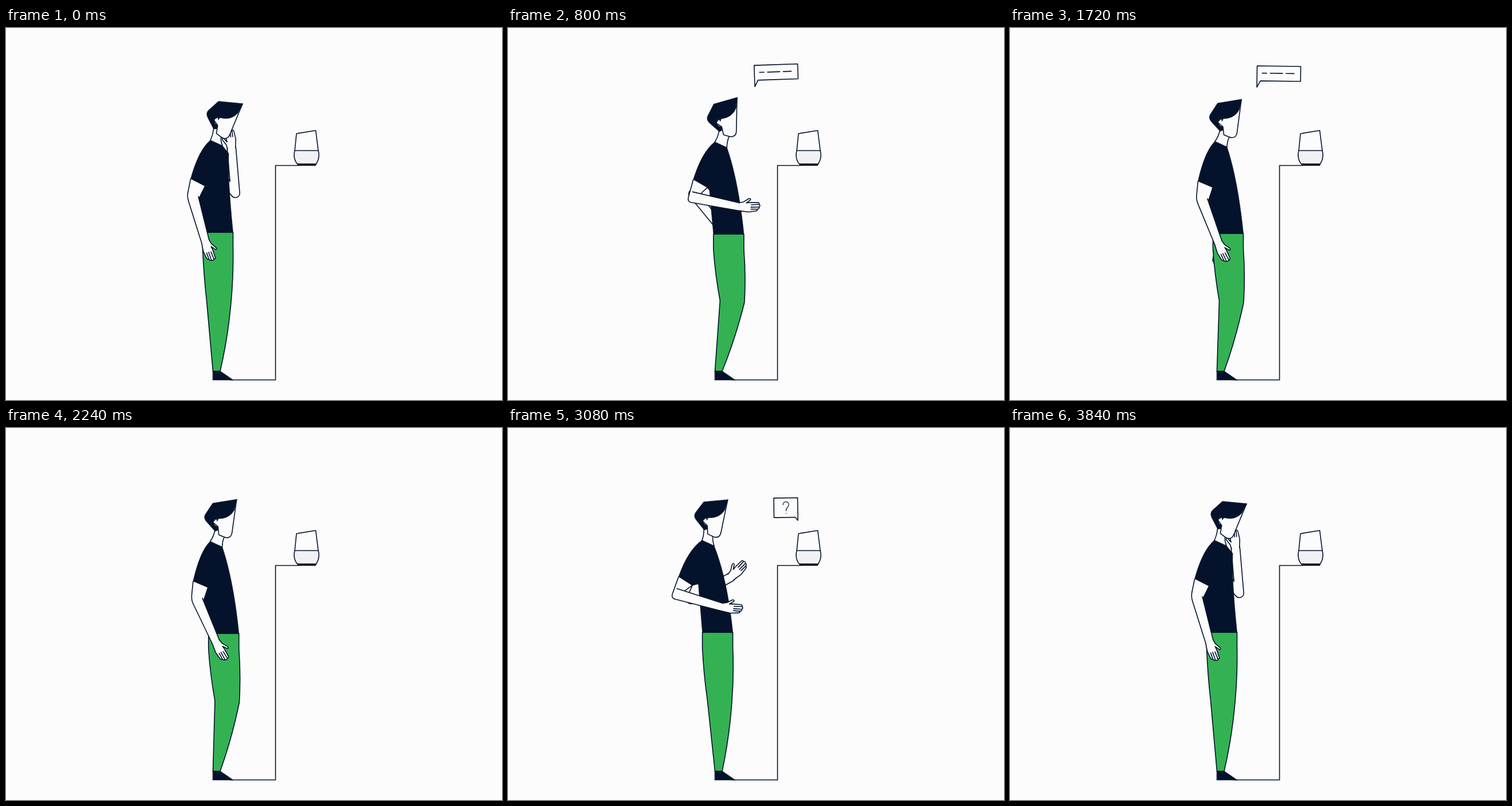
Recreate the animation shown at these times as an HTML page. Size 864x648 px, loop 3880 ms.

```html
<!DOCTYPE html>
<html lang="en">
<head>
<meta charset="utf-8">
<title>Talking to a speaker</title>
<style>
  html, body { margin: 0; width: 100%; height: 100%; overflow: hidden; background: #fcfcfc; }
  svg { display: block; width: 100vw; height: 100vh; }
  .line { fill: none; stroke: #04122b; stroke-width: 1.6; stroke-linejoin: round; stroke-linecap: round; }
  .thin { stroke-width: .6; }
  .skin { fill: #fcfcfc; }
  .navy { fill: #04122b; }
  .green { fill: #34b253; }
</style>
</head>
<body>
<svg viewBox="0 0 864 648">
  <defs>
    <g id="hand">
      <path class="line skin" d="M0 0 L8 -1 L18 -6.3 Q22 -6 20 -3.6 L12.5 1.2 L18 .8 L33 1.8 Q36 2.6 34.5 5
        Q37.6 7 34.5 9.8 Q35.5 12.4 31.5 13.2 Q31.5 16.2 27 16.3 L15 17 L0 14"/>
      <path class="line" d="M21 5 H34.5 M20 9 L34.5 9.8 M20 12.5 L31.5 13.2"/>
    </g>
    <g id="head">
      <path class="line skin" d="M-.5 1 L-8 58 Q-9 67 -17 67 Q-20 67 -31 62 L-32.5 48 L-42 40 L-34 32Z"/>
      <path class="line thin navy" d="M0 0 L-42 7 L-55 27 Q-58 33 -53 39 L-37.5 56 L-32.5 54 L-33 48
        C-40 47 -43 38 -38.5 35 Q-36 34 -35 35.5 L-34 38.5 L-32 34 Q-13 34 -4.5 19Z"/>
    </g>
  </defs>
  <rect width="864" height="648" fill="#fcfcfc"/>

  <path class="line" d="M390 613 H469.5 V239.5 H510"/>
  <path fill="#f0f1f4" d="M503 213.5 H544 C547 225 543 233 539 238 H509 C503 232 500 225 503 213.5Z"/>
  <path class="line" d="M503 213.5 L506 184 L539.5 178.5 L544 213.5 C547 225 543 233 539.5 238
    H508.5 C503 232 500 225 503 213.5 H544"/>
  <path class="navy" d="M506.5 236 H541.5 L539.5 240 H509.5Z"/>

  <path id="neck" class="skin"/>
  <path id="neckLine" class="line"/>
  <path id="farEdge" class="line" style="stroke-width:16.8"/>
  <path id="farFill" class="line" style="stroke-width:13.6;stroke:#fcfcfc"/>
  <use id="farHand" href="#hand"/>
  <path id="pants" class="line green"/>
  <path class="line thin navy" d="M360.3 597.5 H373 L396 613.3 H360.3Z"/>
  <path id="shirt" class="line thin navy"/>
  <use id="face" href="#head"/>
  <path id="arm" class="skin"/>
  <path id="armLine" class="line"/>
  <use id="nearHand" href="#hand"/>

  <g id="talk">
    <path class="line" d="M0 0 V-37 H76 V-11 H6Z"/>
    <path id="words" class="line" d="M9 -24.5 h8 m5.5 0 h21.5 m7 0 h14"/>
  </g>
  <g id="ask">
    <path class="line" d="M0 0 V-39.5 H-41.5 V-5.5 H-4.5Z"/>
    <path id="hook" class="line" style="stroke-width:1.2" pathLength="1"
      d="M-25.5 -27.5 C-25.5 -34.5 -15.5 -34.5 -15.5 -27.5 C-15.5 -22.5 -20.5 -24 -20.5 -17"/>
    <circle id="dot" class="navy" cx="-20.5" cy="-12.5" r=".8"/>
  </g>
</svg>
<script>
const LOOP = 3880, RAD = Math.PI / 180;
const $ = id => document.getElementById(id);
const clamp = v => Math.max(0, Math.min(1, v));
const add = (a, b) => [a[0] + b[0], a[1] + b[1]];
const mix = (a, b, k) => [a[0] + (b[0] - a[0]) * k, a[1] + (b[1] - a[1]) * k];
const turn = ([x, y], deg) => {
  const c = Math.cos(deg * RAD), s = Math.sin(deg * RAD);
  return [x * c - y * s, x * s + y * c];
};
const toward = (a, b, d) => mix(a, b, d / Math.hypot(b[0] - a[0], b[1] - a[1]));
const set = (id, d) => $(id).setAttribute('d', d);
const place = (id, p, deg, s = 1) =>
  $(id).setAttribute('transform', `translate(${p}) rotate(${deg}) scale(${s})`);

// Joint positions across the stage, and limb angles in degrees; the rest of the figure follows.
const think  = { hip: 395.5, hem: 356, knee: 392, collar: 356, face: 56.5, nod: 15, upper: 27, fore: 63, swing: -43, far: -100 };
const start  = { hip: 409, hem: 360, knee: 415, collar: 360, face: 37, nod: -8, upper: 36, fore: 12, swing: 47, far: 24 };
const offer  = { hip: 410.5, hem: 357, knee: 404, collar: 359.5, face: 45.5, nod: 0, upper: 20, fore: 3, swing: 26, far: 55 };
const wait   = { hip: 406.5, hem: 358, knee: 407, collar: 357, face: 46.5, nod: 0, upper: 23, fore: 58, swing: 5, far: 75 };
const listen = { hip: 391.5, hem: 357, knee: 395, collar: 331, face: 45.5, nod: 7, upper: 26, fore: -2, swing: 33, far: 2 };
const wave   = { hip: 393.5, hem: 355.5, knee: 388, collar: 347, face: 46.5, nod: 3, upper: 36, fore: 23, swing: 7, far: -59 };

const KEYS = [[0, think], [520, start], [1160, offer], [1720, wait], [2200, wait],
  [2720, listen], [3360, wave], [3840, think]].map(([t, p]) => ({ t, p }));

function slope(i, n) {
  const a = KEYS[i - 1], b = KEYS[i + 1];
  return a && b ? (b.p[n] - a.p[n]) / (b.t - a.t) : 0;
}

// Smooth curve through the key poses
function poseAt(t) {
  let i = 0;
  while (i < KEYS.length - 2 && t >= KEYS[i + 1].t) i++;
  const a = KEYS[i], b = KEYS[i + 1], span = b.t - a.t, u = clamp((t - a.t) / span);
  const ease = u * u * (3 - 2 * u), pose = {};
  for (const n in a.p) {
    pose[n] = a.p[n] + (b.p[n] - a.p[n]) * ease
      + span * u * (1 - u) * ((1 - u) * slope(i, n) - u * slope(i + 1, n));
  }
  return pose;
}

function drawBody({ hip, hem, knee, collar, face, nod, upper, fore, swing, far }) {
  const nape = [collar, hem - 160.5], front = add(nape, [21, 9.5]);
  const reach = clamp(-swing / 43), chest = add(front, [11 * reach, 13.5 * reach]);

  // Head and neck
  const tip = add(nape, [face, .65 * nod - 73.5]);
  const skull = add(tip, turn([-38, 55], nod)), chin = add(tip, turn([-21.5, 66], nod));
  const back = `${add(mix(skull, nape, .5), [1.5, 2])} ${nape}`;
  const throat = add(mix(chin, front, .4), [-2, 0]);
  set('neck', `M${skull} Q${back} L${front} Q${throat} ${chin}Z`);
  set('neckLine', `M${skull} Q${back} M${chin} Q${throat} ${front}`);
  place('face', tip, nod);

  // Legs
  const rear = hip - 53, rearKnee = knee - 42.5, seat = hem + 27;
  set('pants', `M${rear} ${hem} V${seat} Q${rear + (rearKnee - rear) * .25} 428 ${rearKnee} 475 L360.5 598
    H373 Q${(knee + 373) / 2 + 4} 540 ${knee} 478 Q${hip + (knee - hip) * .6 + 3} 430 ${hip} ${seat} V${hem}Z`);

  // Shirt and sleeve
  const sleeve = add(nape, turn([0, 75.8], upper)), cuff = add(sleeve, turn([28, 0], upper));
  const shoulder = [sleeve[0] + (collar - sleeve[0]) * .4, nape[1] + 17];
  const armpit = [rear - 7, hem - 49 - 2.8 * (upper - 20)];
  set('shirt', `M${nape} Q${shoulder} ${sleeve} L${cuff} L${armpit} L${rear} ${hem} H${hip}
    Q${hip - 9.5} ${front[1] + 58} ${chest} L${front}Z`);

  // Near arm: a straighter arm looks a little shorter
  const elbow = add(sleeve, turn([0, 40 - .14 * fore], 1.5 * upper - 29));
  const wrist = add(elbow, turn([90.5 - .1 * fore, 0], fore)), hand = 1.15 * fore - 5;
  const outer = add(wrist, turn([0, 14], hand));
  const crease = add(elbow, turn([9, -17.5], fore));
  const fold = mix(crease, wrist, .17 - .0018 * hand);
  const edge = `M${sleeve} L${toward(elbow, sleeve, 8)} Q${elbow} ${toward(elbow, outer, 8)} L${outer}`;
  set('arm', `${edge} L${wrist} L${fold} L${cuff}Z`);
  set('armLine', `${edge} M${wrist} L${crease} M${fold} L${cuff}`);
  place('nearHand', wrist, hand);

  // Far arm
  const farTop = add(nape, [4, 50]), farElbow = add(farTop, turn([0, 58], swing));
  const farWrist = add(farElbow, turn([78, 0], far)), farHand = Math.max(-100, 1.4 * far);
  const limb = `M${farTop} L${farElbow} L${add(farWrist, turn([0, 7], farHand))}`;
  set('farEdge', limb);
  set('farFill', limb);
  place('farHand', farWrist, farHand);
}

// Swings in on a damped spring, tips over to leave
function bubble(id, t, from, until, x, y, tilt, drop) {
  const u = t - from, out = clamp((t - until) / 220);
  const m = Math.exp(-u / 120) * Math.cos(u * .0098) + out * out;
  $(id).style.display = u > 0 && out < 1 ? '' : 'none';
  place(id, [x, y + drop * m], tilt + 60 * m, Math.max(0, 1 - m * m));
}

function draw(t) {
  drawBody(poseAt(t));
  bubble('talk', t, 442, 1820, 430, 103, .8, 20);
  bubble('ask', t, 2240, 3270, 505, 161, -.8, 12);

  // Each word grows in turn
  let x = 9;
  set('words', [8, 21.5, 14].map((w, i) => {
    const d = `M${x} -24.5 h${w * clamp((t - 440 - 30 * i) / 100)}`;
    x += w + 6;
    return d;
  }).join(' '));

  $('hook').style.strokeDasharray = `${clamp((t - 2420) / 200)} 2`;
  $('dot').style.opacity = clamp((t - 2600) / 80) * (1 - .6 * clamp((t - 3260) / 100));
}

function tick() {
  draw(performance.now() % LOOP);
  requestAnimationFrame(tick);
}
tick();
</script>
</body>
</html>
```
